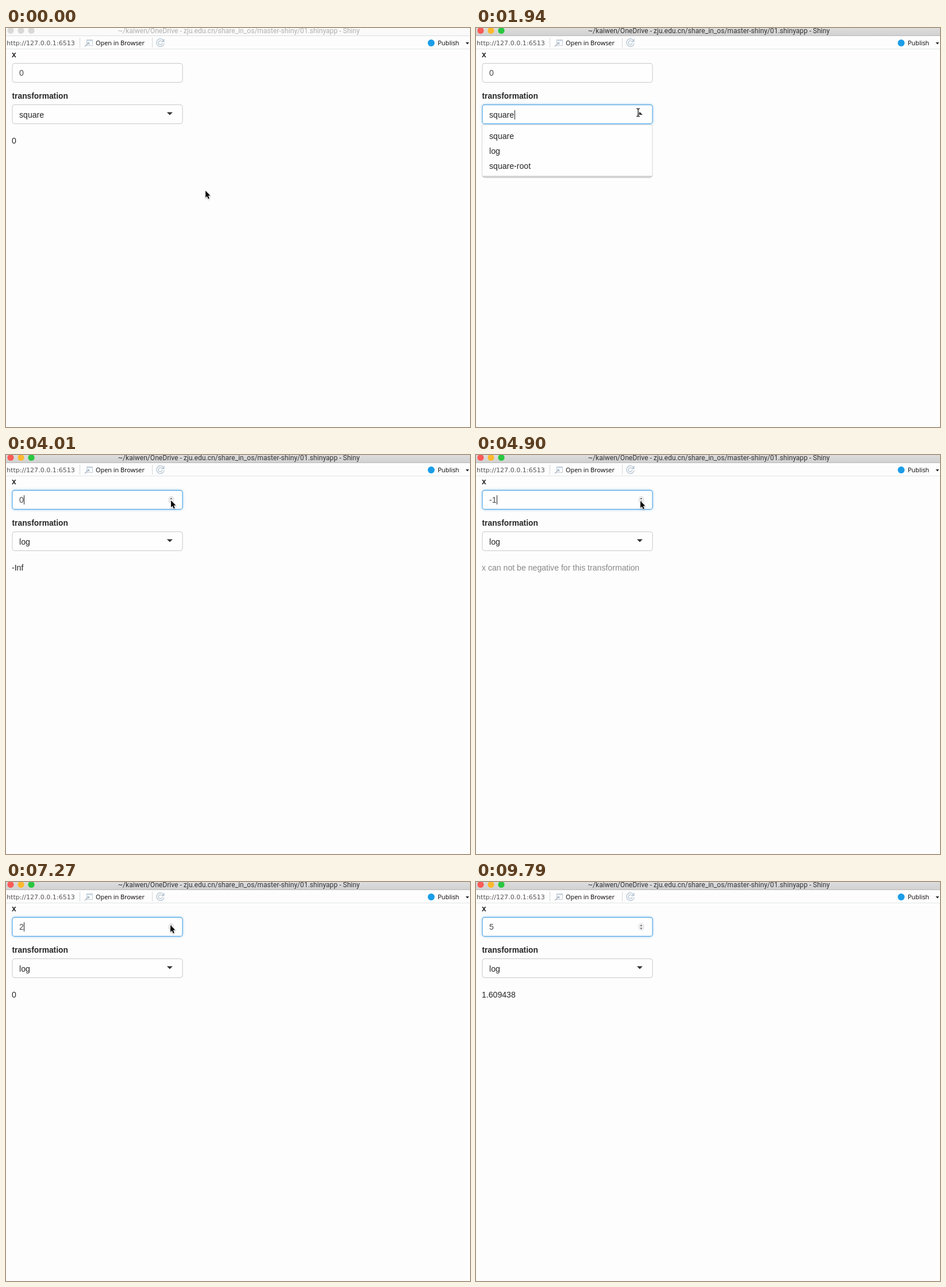
These frames come from a looping animation (807x694 px, 9.94 s). An HTML page with a canvas:

```html
<!DOCTYPE html>
<html lang="en">
<head>
<meta charset="utf-8">
<title>Shiny app</title>
<style>
  html, body { margin: 0; width: 100%; height: 100%; overflow: hidden; background: #fdfdfd; }
  canvas { display: block; }
</style>
</head>
<body>
<canvas id="stage" width="807" height="694"></canvas>
<script>
const ctx = document.getElementById('stage').getContext('2d');
const LOOP = 9940;
const TICK = LOOP / 67;

const BODY = '14.1px "Liberation Sans", Arial, sans-serif';
const LABEL = 'bold 13.8px "Liberation Sans", Arial, sans-serif';
const TOOL = '500 10.9px "Open Sans", sans-serif';
const URL_FONT = '11.1px "DejaVu Sans", sans-serif';
const TITLE = '12.1px Roboto, sans-serif';
const INK = '#262626';
const WARNING = 'x can not be negative for this transformation';

// Events, counted in ticks
const OPEN = 13, PICK = 20, FOCUS = 27, LEAVE = 64;
const DOWN_CLICKS = [31, 35, 37];
const UP_HELD = 42, UP_SLOW = 46;

// Pointer stops: tick, x, y
const STOPS = [
  [2, 346, 282], [7, 288, 57], [10, 281, 145], [14, 282, 147], [17, 163, 211],
  [21, 163, 211], [25, 286, 78], [38, 285, 80], [40, 285, 74], [58, 285, 74], [63, 736, 655]
];

const clamp = (v, lo, hi) => Math.min(hi, Math.max(lo, v));
const ease = p => p * p * (3 - 2 * p);

function pointerAt(k) {
  let [, x, y] = STOPS[0];
  for (let i = 1; i < STOPS.length; i++) {
    const [from, x0, y0] = STOPS[i - 1], [to, x1, y1] = STOPS[i];
    if (k < from) break;
    const p = ease(clamp((k - from) / (to - from), 0, 1));
    x = x0 + (x1 - x0) * p;
    y = y0 + (y1 - y0) * p;
  }
  return [Math.round(x), Math.round(y)];
}

// Single clicks down, then up: held for four steps, four slower ones after
function valueAt(k) {
  const down = DOWN_CLICKS.filter(c => c <= k).length;
  const held = clamp(k - UP_HELD, 0, 4);
  const slow = clamp(Math.floor((k - UP_SLOW) / 2.5), 0, 4);
  return held + slow - down;
}

// The app reacts once a value has stood for two ticks
function settledAt(k) {
  while (valueAt(k) !== valueAt(k - 2)) k--;
  return valueAt(k);
}

function resultAt(k) {
  const x = settledAt(k);
  if (k < PICK) return String(x * x);
  if (x < 0) return WARNING;
  return x === 0 ? '-Inf' : String(Number(Math.log(x).toPrecision(7)));
}

function text(str, x, y, font = BODY, color = INK, align = 'left') {
  ctx.font = font;
  ctx.fillStyle = color;
  ctx.textAlign = align;
  ctx.fillText(str, x, y);
}

function rect(x, y, w, h, color) {
  ctx.fillStyle = color;
  ctx.fillRect(x, y, w, h);
}

function disc(x, y, r, color) {
  ctx.fillStyle = color;
  ctx.beginPath();
  ctx.arc(x, y, r, 0, Math.PI * 2);
  ctx.fill();
}

function poly(points, color) {
  ctx.fillStyle = color;
  ctx.beginPath();
  points.forEach(([x, y]) => ctx.lineTo(x, y));
  ctx.closePath();
  ctx.fill();
}

function stroke(points, color, width = 1) {
  ctx.strokeStyle = color;
  ctx.lineWidth = width;
  ctx.beginPath();
  points.forEach(([x, y]) => ctx.lineTo(x, y));
  ctx.stroke();
}

// Triangle with a level base; a negative height points up
const triangle = (x, y, w, h, color) =>
  poly([[x - w / 2, y], [x + w / 2, y], [x, y + h]], color);

function titleBar(active) {
  const shade = ctx.createLinearGradient(0, 0, 0, 13);
  shade.addColorStop(0, active ? '#dddddd' : '#fafafa');
  shade.addColorStop(1, active ? '#d1d1d1' : '#fafafa');
  rect(0, 0, 807, 13, shade);
  rect(0, 13, 807, 1, active ? '#b9b9b9' : '#dddddd');
  ['#fc5b57', '#fdb92c', '#28c840'].forEach((color, i) =>
    disc(8 + i * 18, 4.5, 5.6, active ? color : '#d9d9d9'));
  text('~/kaiwen/OneDrive - zju.edu.cn/share_in_os/master-shiny/01.shinyapp - Shiny',
    405, 9, TITLE, active ? '#333' : '#b0b0b0', 'center');
}

function toolbar() {
  rect(0, 36, 807, 1, '#e2e4e5');
  text('http://127.0.0.1:6513', 1, 30, URL_FONT, '#555');
  [128, 254].forEach(x => rect(x, 17, 1, 17, '#d4d7d9'));

  // Window with arrow
  ctx.strokeStyle = '#c3cdd6';
  ctx.lineWidth = 1;
  ctx.strokeRect(140.5, 20.5, 10, 10);
  rect(141, 21, 9, 2, '#cbdcec');
  stroke([[137, 32], [144, 26]], '#a3b3c1', 1.4);
  stroke([[141, 25.5], [144.5, 25.5], [144.5, 29]], '#a3b3c1', 1.2);
  text('Open in Browser', 156, 30, TOOL, '#000');

  // Reload
  ctx.strokeStyle = '#b9c8d4';
  ctx.lineWidth = 1.4;
  [6.7, 3.4].forEach(r => {
    ctx.beginPath();
    ctx.arc(268.5, 25.5, r, 0.2, Math.PI * 1.78);
    ctx.stroke();
  });
  poly([[270, 24.5], [275.5, 24.5], [275.5, 18.5]], '#b9c8d4');

  disc(739.5, 26, 6, '#1a9de8');
  text('Publish', 751, 30, TOOL, '#000');
  triangle(802.5, 25, 6, 3.5, '#222');
}

function field(y, focused) {
  ctx.beginPath();
  ctx.roundRect(11, y + 0.5, 296, 33, 4);
  ctx.save();
  if (focused) {
    ctx.shadowColor = 'rgba(102,175,233,.65)';
    ctx.shadowBlur = 5;
  }
  ctx.fillStyle = '#fefefe';
  ctx.fill();
  ctx.restore();
  ctx.lineWidth = focused ? 1.3 : 1;
  ctx.strokeStyle = focused ? '#62aee8' : '#c9c9c9';
  ctx.stroke();
}

function entry(str, base, color, showCaret) {
  text(str, 23, base, BODY, color);
  if (showCaret) rect(Math.round(23.6 + ctx.measureText(str).width), base - 13, 1, 16, '#222');
}

function spinner() {
  ctx.lineWidth = 0.8;
  ctx.strokeStyle = '#c4c4c4';
  ctx.beginPath();
  ctx.roundRect(283.5, 72.5, 8, 11, 3.5);
  ctx.stroke();
  triangle(287.3, 77, 4.6, -3, '#666');
  triangle(287.3, 79.5, 4.6, 3, '#666');
}

function dropdown(hover) {
  ctx.beginPath();
  ctx.roundRect(10.5, 168.5, 296.5, 92, [0, 0, 5, 5]);
  ctx.fillStyle = '#fefefe';
  ctx.fill();
  ctx.save();
  ctx.clip();
  rect(10, 257, 298, 5, '#d3d3d3');
  ctx.restore();
  ctx.lineWidth = 1;
  ctx.strokeStyle = '#d6d6d6';
  ctx.stroke();
  ['square', 'log', 'square-root'].forEach((name, i) => {
    if (i === hover) rect(12, 175 + i * 26, 294, 26, '#f5f5f5');
    text(name, 23, 193 + i * 26);
  });
}

function textPointer(x, y) {
  ctx.save();
  ctx.translate(x, y);
  stroke([[0, -5.5], [0, 5.5]], '#fff', 3);
  stroke([[0, -5.5], [0, 5.5]], '#111', 1.3);
  [-1, 1].forEach(s =>
    stroke([[-3, 7 * s], [-1, 6.7 * s], [0, 5.5 * s], [1, 6.7 * s], [3, 7 * s]], '#111', 1.2));
  ctx.restore();
}

function arrowPointer(x, y) {
  const shape = [[1, 1], [1, 13], [3.7, 10.5], [5.7, 15.2], [7.7, 14.3], [5.7, 9.8], [9.3, 9.5]];
  ctx.save();
  ctx.translate(x, y);
  ctx.shadowColor = 'rgba(0,0,0,.3)';
  ctx.shadowBlur = 2;
  ctx.shadowOffsetY = 1;
  stroke([...shape, shape[0]], '#fff', 1.6);
  ctx.shadowColor = 'transparent';
  poly(shape, '#080808');
  ctx.restore();
}

function draw(t) {
  const k = Math.floor(t / TICK + 0.05);
  const open = k >= OPEN && k < PICK;
  const focused = k >= FOCUS;
  const blink = (k + 2) % 7 < 4;
  const result = resultAt(k);
  const [px, py] = pointerAt(k);

  rect(0, 0, 807, 694, '#fdfdfd');
  titleBar(k >= OPEN);
  toolbar();

  text('x', 10, 51, LABEL);
  field(61, focused);
  entry(String(valueAt(k)), 83, '#4a4a4a', focused && blink);
  if (k >= FOCUS - 2) spinner();

  text('transformation', 10.5, 123, LABEL);
  field(133, open);
  entry(k < PICK ? 'square' : 'log', 156, INK, open && blink);
  triangle(284.8, open ? 151 : 146.6, 10, open ? -5 : 5, '#333');

  text(result, 10, 201, BODY, result === WARNING ? '#888' : INK);
  if (open) dropdown(Math.floor((py - 175) / 26));

  const overText = (k > 10 && k < 15) || (k > 23 && k < FOCUS);
  if (k < LEAVE) (overText ? textPointer : arrowPointer)(px, py);
}

function tick() {
  draw(performance.now() % LOOP);
  requestAnimationFrame(tick);
}
tick();
</script>
</body>
</html>
```
